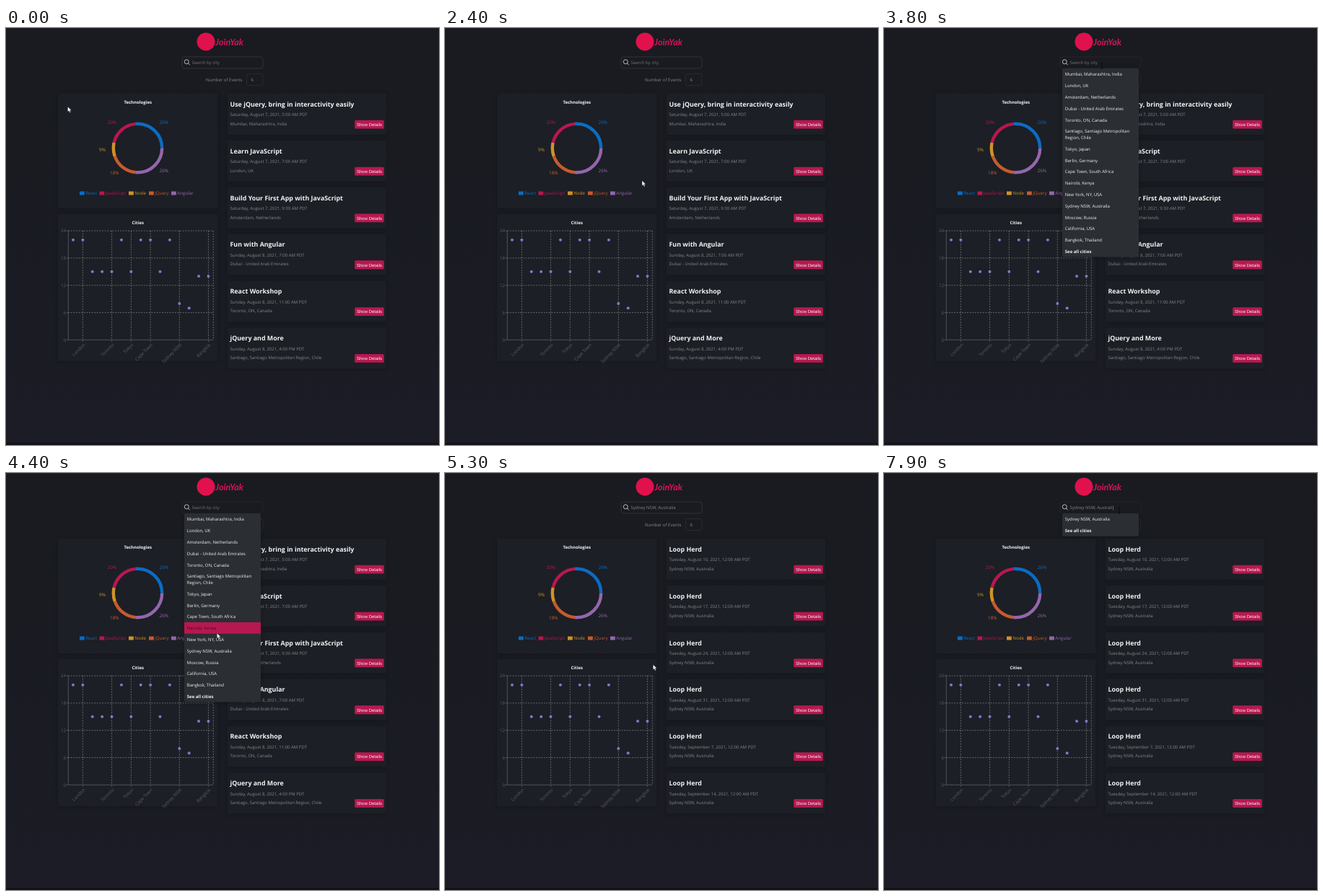
Recreate the animation shown at these times as an HTML page. Size 600 px wide and 578 px high, loop 8000 ms.

```html
<!DOCTYPE html>
<html lang="en">
<head>
<meta charset="utf-8">
<title>Events</title>
<style>
  html, body { margin: 0; height: 100%; overflow: hidden; background: #1a1b22; }
  svg { display: block; width: 600px; height: 578px; }
  text { font-family: "Open Sans", "Noto Sans", sans-serif; text-rendering: geometricPrecision; white-space: pre; }
  .bold { font-weight: 700; }
  .end { text-anchor: end; }
  .mid { text-anchor: middle; }
  .button { font-family: "Liberation Sans", Arial, sans-serif; }
  .brand { font-family: Lato, sans-serif; font-style: italic; font-weight: 700; }
</style>
</head>
<body>
<svg viewBox="0 0 600 578">
  <defs>
    <linearGradient id="bg" x2="0" y2="1">
      <stop stop-color="#191b20"/><stop offset="1" stop-color="#1b1c25"/>
    </linearGradient>
    <filter id="shadow" x="-10%" y="-10%" width="120%" height="130%" color-interpolation-filters="sRGB">
      <feDropShadow dx="0" dy="1" stdDeviation="2.5" flood-color="#0c0d11" flood-opacity=".45"/>
    </filter>
  </defs>
  <g id="page"></g>
  <g id="live"></g>
</svg>
<script>
const LOOP = 8000, STEP = 100;
const PINK = '#b71850', GREY = '#85878c', DIM = '#5c5f64', WHITE = '#f2f2f3';
const page = document.getElementById('page');
const live = document.getElementById('live');

// y is the middle of the capitals
const text = (x, y, str, fill, cls = '', size = 6, more = '') =>
  `<text x="${x}" y="${y}" dy=".36em" font-size="${size}" fill="${fill}" class="${cls}" ${more}>${str}</text>`;
const rect = (x, y, w, h, fill, more = '') =>
  `<rect x="${x}" y="${y}" width="${w}" height="${h}" fill="${fill}" ${more}/>`;
const line = (x1, y1, x2, y2, more) =>
  `<path d="M${x1} ${y1}L${x2} ${y2}" ${more}/>`;
const card = (x, y, w, h) => rect(x, y, w, h, '#1c1f25', 'rx="2" filter="url(#shadow)"');

function header() {
  return rect(0, 0, 600, 578, 'url(#bg)') + rect(0, 0, 600, 1, '#25262c') + rect(0, 575, 600, 3, '#141218') +
    '<circle cx="277" cy="19" r="12.5" fill="#e0114c"/>' +
    text(290, 19, 'JoinYak', '#d5145a', 'brand', 12.5) +
    text(277, 72, 'Number of Events', GREY) +
    rect(333.5, 63.5, 22.5, 16, '#1a1b20', 'rx="3" stroke="#2d2f35" stroke-width=".8"') +
    text(339.5, 72, '6', GREY);
}

function pie() {
  const slices = [
    ['React', 26, '#0b6cc4', 102, 212.5, 131], ['JavaScript', 20, '#b8174f', 129.5, 140.5, 130.5],
    ['Node', 9, '#cf9328', 170, 129, 168.5], ['jQuery', 18, '#c65b2d', 198, 144, 200.5],
    ['Angular', 26, '#9566ab', 229, 212.5, 197.5]];
  let sum = 0, out = card(72, 91, 221.5, 159) + text(182.7, 103.2, 'Technologies', WHITE, 'bold mid');
  for (const [name, share, color, keyX, x, y] of slices) {
    out += `<circle r="33.7" transform="translate(182.5 166.5) scale(1 -1)" fill="none" stroke="${color}"
      stroke-width="4.4" pathLength="99" stroke-dasharray="${share} 99" stroke-dashoffset="${-sum}"/>` +
      text(x, y, share + '%', color, '', 6.4) +
      rect(keyX, 226.5, 6.8, 5, color) + text(keyX + 8.3, 228.8, name, color, '', 6.2);
    sum += share;
  }
  return out;
}

function scatter() {
  const px = i => 93 + 13.39 * i, py = v => 432.3 - v * 6.3;
  const counts = [22, 22, 15, 15, 15, 22, 15, 22, 22, 15, 22, 8, 7, 14, 14];
  const ticks = { 1: 'London', 4: 'Toronto', 6: 'Tokyo', 8: 'Cape Town', 11: 'Sydney NSW', 14: 'Bangkok' };
  const dash = 'stroke="#97999c" stroke-width=".6" stroke-dasharray="1.9 1.7"';
  const solid = `stroke="${DIM}" stroke-width=".8"`;
  let out = card(72, 258, 221.5, 204) + text(182.7, 270.2, 'Cities', WHITE, 'bold mid');
  for (let v = 0; v <= 24; v += 6) {
    if (v) out += line(86.3, py(v), 287.3, py(v), dash);
    out += line(83.5, py(v), 86.3, py(v), solid) + text(83, py(v), v, DIM, 'end', 6.2);
  }
  for (const [i, city] of Object.entries(ticks)) {
    const x = px(i);
    out += line(x, 281, x, 432, dash) + line(x, 432, x, 435, solid) +
      text(0, 0, city, DIM, 'end', 6.2, `transform="translate(${x + 2} 438) rotate(-45)"`);
  }
  out += line(287.3, 281, 287.3, 432, dash) + line(86.3, 281, 86.3, 432.3, solid) + line(86.3, 432.3, 287.3, 432.3, solid);
  counts.forEach((v, i) => out += `<circle cx="${px(i)}" cy="${py(v)}" r="2" fill="#7f79cc"/>`);
  return out;
}

const sydney = 'Sydney NSW, Australia';
const firstEvents = [
  ['Use jQuery, bring in interactivity easily', 'Saturday, August 7, 2021, 5:00 AM PDT', 'Mumbai, Maharashtra, India'],
  ['Learn JavaScript', 'Saturday, August 7, 2021, 7:00 AM PDT', 'London, UK'],
  ['Build Your First App with JavaScript', 'Saturday, August 7, 2021, 9:30 AM PDT', 'Amsterdam, Netherlands'],
  ['Fun with Angular', 'Sunday, August 8, 2021, 7:00 AM PDT', 'Dubai - United Arab Emirates'],
  ['React Workshop', 'Sunday, August 8, 2021, 11:00 AM PDT', 'Toronto, ON, Canada'],
  ['jQuery and More', 'Sunday, August 8, 2021, 4:00 PM PDT', 'Santiago, Santiago Metropolitan Region, Chile']];
const sydneyEvents = ['August 10', 'August 17', 'August 24', 'August 31', 'September 7', 'September 14']
  .map(day => ['Loop Herd', `Tuesday, ${day}, 2021, 12:00 AM PDT`, sydney]);

const rowY = i => 64.85 * i;
const eventCards = () => firstEvents.map((_, i) =>
  card(306.5, 91 + rowY(i), 220.5, 57) +
  rect(483.2, 127.8 + rowY(i), 40.6, 11.8, PINK, 'rx="1.5"') +
  text(503.5, 133.8 + rowY(i), 'Show Details', WHITE, 'button mid')).join('');
const eventTexts = events => events.map(([title, date, place], i) =>
  text(310.5, 105.6 + rowY(i), title, WHITE, 'bold', 8.9) +
  text(310.5, 120.2 + rowY(i), date, GREY) +
  text(310.5, 132.7 + rowY(i), place, GREY)).join('');

const cities = ['Mumbai, Maharashtra, India', 'London, UK', 'Amsterdam, Netherlands', 'Dubai - United Arab Emirates',
  'Toronto, ON, Canada', 'Santiago, Santiago Metropolitan|Region, Chile', 'Tokyo, Japan', 'Berlin, Germany',
  'Cape Town, South Africa', 'Nairobi, Kenya', 'New York, NY, USA', sydney, 'Moscow, Russia',
  'California, USA', 'Bangkok, Thailand'];

function dropdown(names, mouse) {
  let y = 56.2, items = '';
  [...names, 'See all cities'].forEach((name, n) => {
    const lines = name.split('|'), h = 7.3 + 8.5 * lines.length;
    const hover = mouse.y >= y && mouse.y < y + h && mouse.x > 247 && mouse.x < 353;
    if (hover) items += rect(247, y, 106, h, PINK);
    lines.forEach((s, i) => items +=
      text(250.8, y + 8.1 + 8.5 * i, s, hover ? '#3d0f25' : WHITE, n === names.length ? 'bold' : ''));
    y += h;
  });
  return rect(247, 56, 106, y - 56, '#2b2e33', 'rx="2" filter="url(#shadow)"') + items;
}

function search(query, focused, caret) {
  const border = focused ? '#25272c' : '#34363c';
  return rect(244, 40, 112, 16, '#1a1b20', `rx="3.5" stroke="${border}" stroke-width=".9"`) +
    '<g fill="none" stroke="#b9bbc0" stroke-width="1"><circle cx="250.3" cy="46.8" r="3"/><path d="M252.5 49l2.3 2.4"/></g>' +
    `<text x="257.6" y="48.2" dy=".36em" font-size="6" fill="${query ? GREY : '#74767b'}">${query || 'Search by city'}` +
    (caret ? '<tspan fill="#c4c6ca" dx="-.4">|</tspan>' : '') + '</text>';
}

// time, x, y of the pointer
const path = [[0, 85.5, 109], [200, 80, 118], [800, 18.5, 273], [1000, 56, 330], [1400, 140, 370], [1900, 235, 290],
  [2400, 273, 211.5], [2800, 288, 150], [3300, 301, 66], [3500, 302, 52], [3900, 302, 52], [4400, 292.3, 222],
  [4700, 289, 246], [4900, 289, 246], [5300, 288.3, 265.5], [5700, 292, 250], [6300, 318, 82], [6600, 326, 52], [8000, 326, 52]];

function pointerAt(t) {
  const n = path.findIndex(p => p[0] > t), [t0, x0, y0] = path[n - 1], [t1, x1, y1] = path[n];
  const k = (t - t0) / (t1 - t0);
  return { x: x0 + (x1 - x0) * k, y: y0 + (y1 - y0) * k };
}

function pointer({ x, y }) {
  const typing = x > 244 && x < 356 && y > 40 && y < 56;
  return typing
    ? `<path d="M${x - 1.3} ${y - 4}h2.6m-1.3 0v8m-1.3 0h2.6" fill="none" stroke="#08090b" stroke-width=".8"/>`
    : `<path d="M${x} ${y}v7.2l1.7-1.5 1.2 2.7 1.3-.6-1.2-2.6h2.3z" fill="#fff" stroke="#111" stroke-width=".4"/>`;
}

function draw(t) {
  const mouse = pointerAt(t);
  const picked = t >= 4900;
  const fullList = t >= 3800 && !picked, shortList = t >= 6900;
  const query = !picked ? '' : t < 7500 ? sydney : sydney.slice(0, -1);
  live.innerHTML = eventTexts(picked ? sydneyEvents : firstEvents) +
    search(query, fullList || shortList, shortList) +
    (fullList ? dropdown(cities, mouse) : shortList ? dropdown([sydney], mouse) : '') +
    pointer(mouse);
}

page.innerHTML = header() + pie() + scatter() + eventCards();
const start = performance.now();
let shown = -1;
function tick() {
  const t = Math.floor((performance.now() - start) % LOOP / STEP) * STEP;
  if (t !== shown) draw(shown = t);
  requestAnimationFrame(tick);
}
tick();
</script>
</body>
</html>
```
